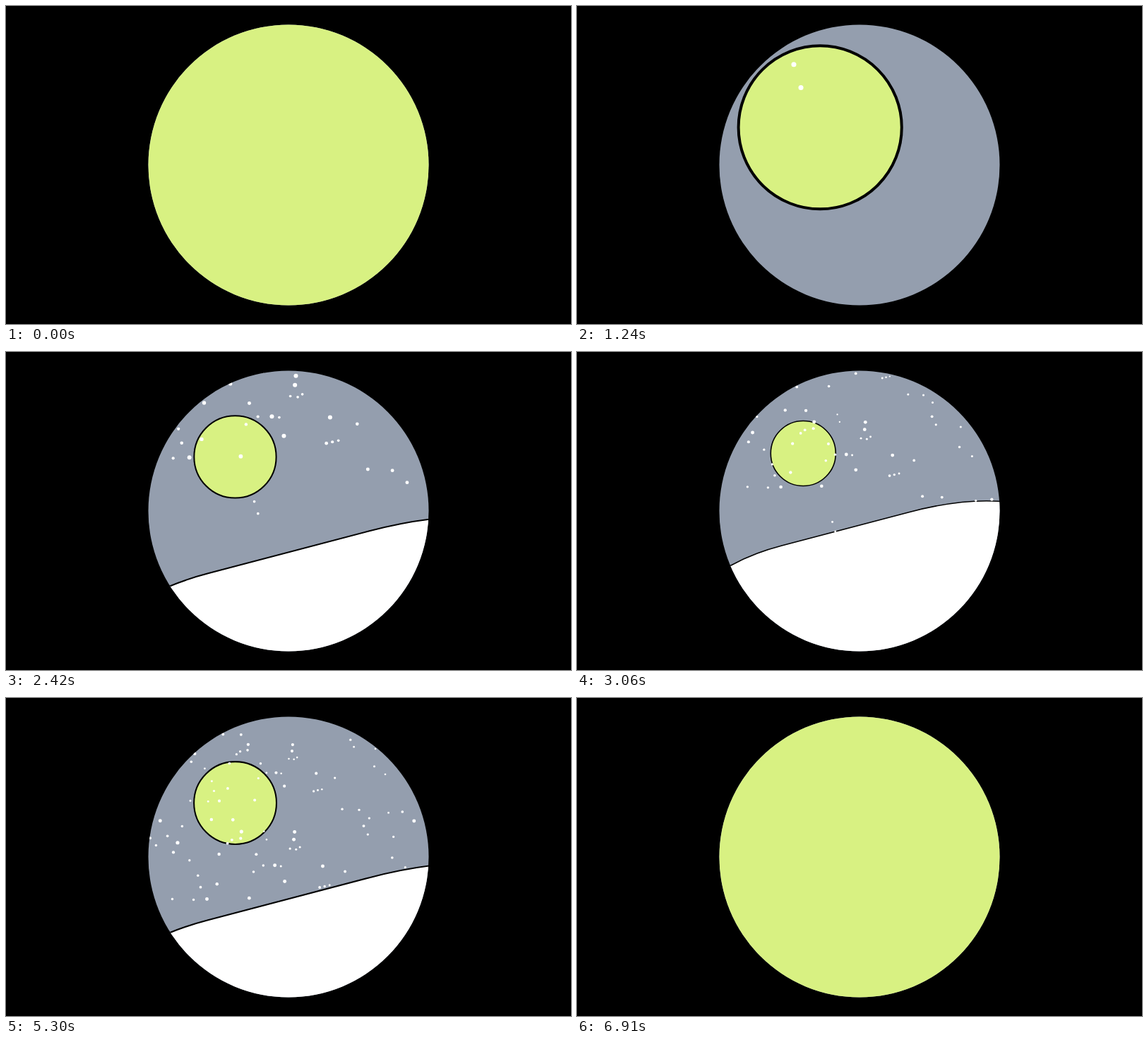
Recreate the animation shown at these times as an HTML page. Size 800 by 450 pixels, loop 6.97 s.

```html
<!DOCTYPE html>
<html lang="en">
<head>
<meta charset="utf-8">
<title>Snowy night</title>
<style>
  html, body { margin: 0; width: 100%; height: 100%; overflow: hidden; background: #000; }
  svg { display: block; width: 100vw; height: 100vh; }
</style>
</head>
<body>
<svg viewBox="0 0 800 450">
  <defs>
    <clipPath id="porthole"><circle cx="400" cy="225" r="198.5"/></clipPath>
    <g id="flakes" fill="#fff"></g>
  </defs>
  <g clip-path="url(#porthole)">
    <rect width="800" height="450" fill="#949eae"/>
    <g id="scene" stroke="#000" stroke-width="1.6">
      <circle cx="320.3" cy="143.5" r="46" fill="#d8f182"/>
      <path d="M170 328L217 302.5Q250 284.4 290 274L470 226.7C510 216.2 555 208.5 598 211.3L640 215V700H170Z" fill="#fff"/>
    </g>
    <g id="near"><use href="#flakes"/></g>
    <g id="far"><use href="#flakes" transform="translate(74.4 -87) scale(.811)"/></g>
  </g>
</svg>
<script>
const LOOP = 6970;
const FALL_ORIGIN = 4360;   // time at which the flakes sit at their drawn places
const EXIT_MS = 1370;
const byId = id => document.getElementById(id);

function seededRandom(seed) {
  return () => (seed = seed * 16807 % 2147483647) / 2147483647;
}

function addFlake(x, y, r) {
  const flake = document.createElementNS("http://www.w3.org/2000/svg", "circle");
  for (const [name, value] of Object.entries({ cx: x, cy: y, r })) flake.setAttribute(name, value);
  byId("flakes").append(flake);
}

// The clusters in the middle, and the first two flakes to arrive.
[[408, 155], [407, 165], [395, 220], [445, 200], [382, 199]].forEach(p => addFlake(...p, 2.3));
[[402, 177], [410, 178], [415, 175], [390, 200], [363, 291], [367, 304]].forEach(p => addFlake(...p, 1.4));
for (let i = 0; i < 3; i++) addFlake(441 + 6.5 * i, 228 - 1.5 * i, 1.8 - 0.2 * i);

// Loose flakes on both sides, more of them on the left.
const random = seededRandom(2024);
function scatter(count, left, width, top, height) {
  for (let i = 0; i < count; i++) {
    const x = left + width * (i + random()) / count;
    addFlake(x, top + height * random(), 1.4 + random());
  }
}
scatter(25, 218, 150, 138, 108);
scatter(13, 474, 118, 131, 140);

// Distance grows evenly to 1, rests, then falls evenly to 0; size is its inverse.
const distance = (t, start, duration, exit) =>
  Math.min(1, (t - start) / duration, 1 - (t - exit) / EXIT_MS);

const zoom = (element, scale, x, y, drop = 0) =>
  element.setAttribute("transform",
    `translate(${x} ${y}) scale(${scale}) translate(${-x} ${drop - y})`);

function snow(id, t, d, speed) {
  const layer = byId(id);
  layer.setAttribute("visibility", d > 0.03 ? "visible" : "hidden");
  zoom(layer, 1 / Math.max(d, 0.03), 400, 225, (t - FALL_ORIGIN) * speed);
}

function draw(t) {
  const d = distance(t, 47, 3000, 5010);
  zoom(byId("scene"), 1 / Math.max(d, 0.02), 304.5, 124.8);
  snow("near", t, distance(t, -40, 3220, 5203), 0.0393);
  snow("far", t, distance(t, 0, 3080, 5164), 0.046);
}

const begin = performance.now();
function tick() {
  draw((performance.now() - begin) % LOOP);
  requestAnimationFrame(tick);
}
draw(0);
requestAnimationFrame(tick);
</script>
</body>
</html>
```
